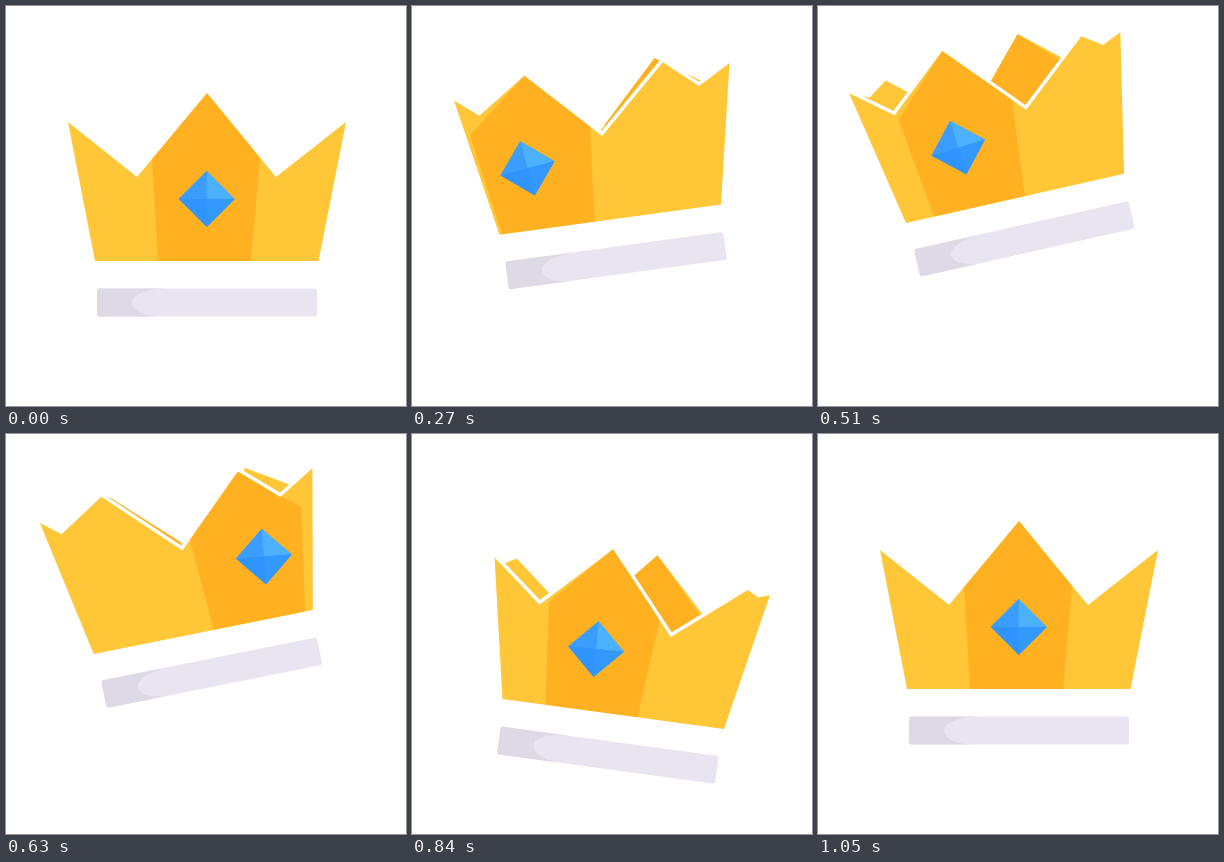
Recreate the animation shown at these times as an HTML page. Size 400 by 400 pixels, loop 2.11 s.

```html
<!DOCTYPE html>
<html lang="en">
<head>
<meta charset="utf-8">
<title>Spinning crown</title>
<style>
  html, body { margin: 0; width: 100%; height: 100%; overflow: hidden; background: #fff; }
  svg { display: block; width: 100%; height: 100%; }
</style>
</head>
<body>
<svg viewBox="0 0 400 400">
  <defs>
    <clipPath id="frontClip"><polygon class="front"/></clipPath>
  </defs>
  <g id="crown">
    <g id="back" transform="matrix(-1 0 0 1 401.5 0)">
      <polygon class="front" fill="#ffc637"/>
      <g clip-path="url(#frontClip)"><polygon id="backPanel" fill="#ffb122"/></g>
    </g>
    <polygon class="front" fill="#fff" stroke="#fff" stroke-width="7"/>
    <polygon class="front" fill="#ffc637"/>
    <g clip-path="url(#frontClip)">
      <polygon id="frontPanel" fill="#ffb122"/>
      <g id="gem">
        <path fill="#3094ff" d="M0-28L28 0 0 28-28 0z"/>
        <path fill="#3b9eff" d="M0-28V0H-28z"/>
        <path fill="#4cb1ff" d="M0-28V0H28z"/>
        <path fill="#3399ff" d="M0 28V0H28z"/>
      </g>
    </g>
    <rect x="91" y="282.5" width="220" height="28" rx="2.5" fill="#eae4f0"/>
    <path fill="#dfd9e5" d="M93.5 282.5H160C140 283 126 289 126 296.500C126 304 137 309.500 152 310.500H93.500Q91 310.500 91 308V285Q91 282.500 93.500 282.500Z"/>
  </g>
</svg>
<script>
const LOOP = 2110, STEP = 30, LAST = 35;
const PIVOT = [200.5, 275];

const smooth = x => x * x * (3 - 2 * x);
const easeOut = x => 1 - (1 - x) ** 3;
const easeIn = x => x ** 3;
const settle = x => smooth(x ** 1.1);
const mix = (a, b, k) => a + (b - a) * k;
const mixPoint = (a, b, kx, ky = kx) => [mix(a[0], b[0], kx), mix(a[1], b[1], ky)];

// step, angle, x, y, easing into this pose
const poses = [
  [0, 0, 0, 0],
  [5, 4, -1, 9.5, smooth],
  [17, -12.7, 0.7, -63, easeOut],
  [27, 8, -2.3, 25.5, easeIn],
  [35, 0, 0, 0, settle]
];

// step, quarter turns, speed per step
const turns = [
  [0, 0, 0], [5, 0.1, 0.03], [9, 0.475, 0.115], [13, 1.04, 0.226], [17, 2.28, 0.32],
  [21, 3.53, 0.226], [25, 4.053, 0.09], [27, 4.17, 0], [31, 4.094, -0.026], [35, 4, 0]
];

function segment(keys, step) {
  const i = Math.max(1, keys.findIndex(key => key[0] >= step));
  const a = keys[i - 1], b = keys[i];
  return [a, b, (step - a[0]) / (b[0] - a[0])];
}

function poseAt(step) {
  const [a, b, x] = segment(poses, step);
  return [1, 2, 3].map(n => mix(a[n], b[n], b[4](x)));
}

function turnAt(step) {
  const [a, b, x] = segment(turns, step);
  const span = b[0] - a[0], rest = 1 - x;
  return mix(a[1], b[1], smooth(x)) + span * x * rest * (rest * a[2] - x * b[2]);
}

const leftTip = [62, 116], rightTip = [340, 116], peak = [201, 87];
const leftDip = [131, 171], rightDip = [270, 171];

// u is the progress from one view of the crown to the next
function outline(u) {
  const sink = 1 - (1 - u) ** 1.7, rise = u ** 1.45;
  return [
    leftTip,
    mixPoint(leftDip, leftTip, sink),
    mixPoint(peak, leftTip, u),
    mixPoint(rightDip, leftDip, u),
    mixPoint(rightTip, peak, u, rise),
    mixPoint(rightTip, rightDip, u, rise),
    rightTip, [312.5, 255], [89, 255]
  ];
}

// w is how far the panel has turned to the left, in quarter turns
function panel(w) {
  const shift = -121 * w * (1 + 0.9 * w ** 4);
  const left = 152 + shift, right = 245 + shift;
  const top = w >= 0
    ? mixPoint(peak, leftTip, w)
    : mixPoint(rightTip, peak, 1 + w, (1 + w) ** 1.45);
  return [
    [left, 256],
    [left - 6 - 27 * Math.max(w, 0), 153],
    top,
    [right + 9 + 17 * Math.max(-w, 0), 152],
    [right, 256]
  ];
}

const byId = id => document.getElementById(id);
const crown = byId("crown"), gem = byId("gem"), back = byId("back");
const frontPanel = byId("frontPanel"), backPanel = byId("backPanel");
const fronts = document.querySelectorAll(".front");
const setPoints = (el, points) =>
  el.setAttribute("points", points.map(p => p.map(v => v.toFixed(2)).join()).join(" "));

function draw(step) {
  const [angle, x, y] = poseAt(step);
  const turn = turnAt(step);
  const u = turn - Math.floor(turn);
  const w = turn - 2 * Math.round(turn / 2);
  crown.setAttribute("transform", `translate(${x} ${y}) rotate(${angle} ${PIVOT})`);
  const shape = outline(u);
  fronts.forEach(el => setPoints(el, shape));
  setPoints(frontPanel, panel(w));
  setPoints(backPanel, panel(turn - Math.round(turn)));
  back.style.display = u === 0 ? "none" : "";
  gem.setAttribute("transform", `translate(${200.7 - 158 * w} 193) rotate(${-15 * w})`);
}

const start = performance.now();
function tick() {
  const time = (performance.now() - start) % LOOP;
  draw(Math.min(LAST, Math.floor(time / STEP)));
  requestAnimationFrame(tick);
}
tick();
</script>
</body>
</html>
```
